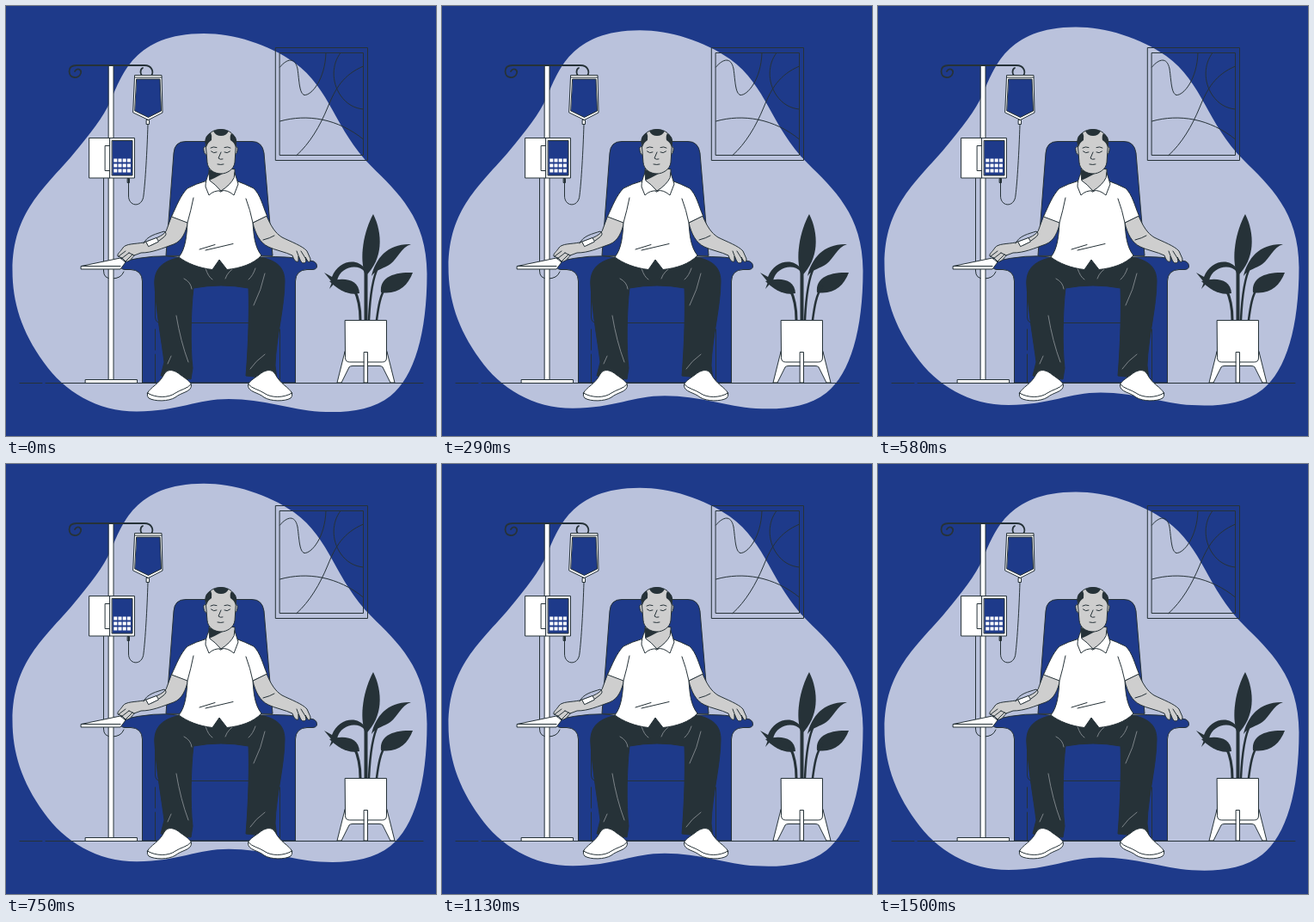
Animation of 500x500 px, one loop 1.54 s. Source, as an HTML page with a canvas:

```html
<!DOCTYPE html>
<html lang="en">
<head>
<meta charset="utf-8">
<title>Infusion therapy</title>
<style>
html, body { margin: 0; width: 100%; height: 100%; overflow: hidden; background: #1e3a8a; }
canvas { display: block; width: 100vw; height: 100vh; }
</style>
</head>
<body>
<canvas id="stage" width="500" height="500"></canvas>
<script>
const ctx = document.getElementById('stage').getContext('2d');
const BLUE = '#1e3a8a', PALE = '#bac2dc', INK = '#263238', WHITE = '#fff', SKIN = '#cecece', CREASE = '#7d8489';
const LOOP = 1540, TICK = 1000 / 24, PERIOD = 1500, LIFT = 10;

ctx.lineCap = ctx.lineJoin = 'round';

function shape(d, fill, stroke = INK, width = 1) {
  const path = new Path2D(d);
  if (fill) { ctx.fillStyle = fill; ctx.fill(path); }
  if (stroke) { ctx.strokeStyle = stroke; ctx.lineWidth = width; ctx.stroke(path); }
}
const line = (d, color = INK, width = 1) => shape(d, null, color, width);
const box = (x, y, w, h, fill, stroke = INK) => shape(`M${x},${y}h${w}v${h}h${-w}Z`, fill, stroke);

function mirrored(axis, draw) {
  draw();
  ctx.save();
  ctx.translate(2 * axis, 0);
  ctx.scale(-1, 1);
  draw();
  ctx.restore();
}

function backdrop(lift) {
  ctx.fillStyle = BLUE;
  ctx.fillRect(0, 0, 500, 500);
  ctx.save();
  ctx.translate(0, -lift);
  shape(`M230,32.5 C265,32.5 305,45 335,66 C378,97 382,144 425,187
    C455,217 489.5,247 489.5,312 C489.5,380 475,432 447,454 C425,471 395,474 365,472.2
    C330,470 300,457.5 259,457.5 C222,457.5 200,471.8 152,472 C106,472 68,449 44,415
    C18,379 7.5,345 7.5,308 C7.5,240 45,212 78,173 C98,149 113,130 122,110
    C135,81 149,32.5 230,32.5Z`, PALE, null);
  ctx.restore();
}

function picture() {
  box(313.7, 48.5, 106.8, 131);
  box(318.5, 54.5, 97, 119);
  line('M318.5,71 C327,61 336,59 339,73 C341,87 341,102 347,103.5 C355,104 371,86 372,54.5');
  line('M389,54.5 C379,67 378,88 389,104 C396,114 405,119 415.5,120');
  line('M415.5,70 C392,80 383,96 374,118 C365,140 353,160 338,173.5');
  line('M318.5,134 C350,125 386,131 415.5,155');
}

function stand() {
  line('M116,163 Q113.5,164 113.5,172 V308 Q113.5,317 123,317 Q134,317 137,309');
  box(119.5, 69.5, 5.5, 365, WHITE);
  box(92.5, 434.5, 60, 4, WHITE);
  line('M80,76 C83,71 88,74 87,78 C85,85 74,85 73.5,76 C73.5,71 77,69 82,69 H161 C170,69 172,77 169,81 C165,85 157,83 156.5,77 Q156.5,73 159,72', INK, 1.8);

  shape('M150,80.5 H181 L182,124 L165.5,132.5 L148,124Z', WHITE);
  line('M149.5,83 H181');
  shape('M152,85 H179 L180.5,122 L165.5,129.5 L150,122Z', BLUE);
  box(163.5, 132.5, 3, 5, WHITE);
  line('M165,138 C164,170 162,204 160,220 C159,235 142,234 142.5,220 V205');

  box(97, 153.5, 24, 46.5, WHITE);
  box(115.5, 162.5, 6, 29, WHITE);
  box(121, 153.5, 28.5, 46.5, WHITE);
  box(123.5, 156.5, 23.5, 40.5, BLUE);
  for (let row = 0; row < 3; row++)
    for (let col = 0; col < 4; col++)
      box(125.3 + col * 5.2, 177.5 + row * 6, 4, 4, WHITE, null);
  box(141.5, 200.5, 2, 5, INK);
}

function chair() {
  shape('M186,290 L195,171 Q196,157.5 209,157.5 H286 Q298,157.5 300,171 L310,290Z', BLUE);
  shape(`M135,297 Q175,288 200,292 H297 Q330,290 358,297 Q362,299 361.5,303 Q361,306.5 356,306.5 H350
    Q337,307 336.5,320 V438 H158.5 V320 Q158,307 145,306.5 H138 Q133,306 133,302Z`, BLUE);
  line('M173.5,318 V362 Q174,368.5 180,368.5 H314 Q319,368 319,362 V330');
  line('M173.5,376 V400 M173.5,405 V438 M318.5,376 V438');
}

function plant() {
  shape('M418,314 C410,293 416,262 427,242 C438,264 439,294 418,314Z', INK, null);
  shape('M425,314 C430,293 444,276 471,277 C459,281 456,293 447,300 C440,305 431,306 425,314Z', INK, null);
  shape('M436,333 C434,316 450,309 473,310 C467,326 455,336 436,333Z', INK, null);
  shape('M417,309 C409,299 389,303 385,319 L376,329 L379,321 L370,310 L379,315 C386,296 408,292 417,305Z', INK, null);
  shape('M376,320 C394,315 410,318 411,334 C398,337 386,330 376,320Z', INK, null);
  line('M418.5,365 V308', INK, 4);
  line('M412,365 C412,352 409,338 405,330', INK, 3);
  line('M422,365 C423,343 425,318 433,303', INK, 2.5);
  line('M431,365 C433,350 435,336 442,326', INK, 2.5);
  mirrored(418.5, () => shape('M394,402 L385,438 H390 L399,420 Q400,418.5 403,418.5 H418.5 V412 H396Z', WHITE));
  shape('M394.5,365.5 H442.5 V409 Q442.5,414 437.5,414 H399.5 Q394.5,414 394.5,409Z', WHITE);
  box(416.5, 402.5, 4, 35.5, WHITE);
}

function legs() {
  shape(`M203,292 C184,296 171,304 173,326 C175,357 181,390 184,414 L180,430 L215,434 L217,421
    C214,396 215,352 218,328 Q250,322 282,328 C283,352 282,393 279,430 L315,434 L313,418
    C314,385 324,350 324,320 C324,302 312,295 295,292Z`, INK);
  line('M207,317 Q215,321 216,329 M232,305 Q235,315 240,318 M268,303 Q258,308 255,317', CREASE);
  line('M290,305 Q287,314 282,318 M301,311 Q297,330 288,348 M198,360 Q203,390 212,414', CREASE);
  line('M301,405 Q290,413 284,422 M192,407 L188,416', CREASE);
  mirrored(248.5, () => {
    shape(`M164.5,450 C168,443 178,440 184,428 C188,421 196,423 203,429 C210,434 215,437 215.5,441
      C215.5,449 204,449 197,455 C189,460 173,460 166,456 Q163.5,454 164.5,450Z`, WHITE);
    line('M164.5,450 C174,456 189,456 197,450 C203,446 211,445 215,440');
  });
}

function arms() {
  shape('M87.5,302.5 L133,293 L139,298 L133,306 H87.5Z', WHITE);
  line('M87.5,302.5 H133');
  shape(`M193,244 L212,250 C209,263 205,273 195,277 C181,282 170,287 157,287 L149,290
    C146,294 143,298 139,297 L135,293 L130,291 C129,288 133,286 136,281 C140,276 150,277 160,275
    C172,271 182,268 186,262Z`, SKIN);
  line('M131,291 L139,285 M134,294 L143,287 M139,297 L147,289 M143,287 L149,290');
  line('M160,276 C164,267 175,265 184,262 Q189,265 182,270 Q176,275 169,278');
  shape('M163,274 L175,269.5 L177.5,274 L166,279.5Z', WHITE);

  shape(`M287,252 L303,244 C308,256 313,264 321,269 C331,274 345,279 350,285 L354,294
    Q354,299 351,297 L348,292 L349,297 Q346,301 343,297 L340,291 L340,297 Q336,299 333,290
    C325,286 313,284 305,280 C295,275 290,265 287,252Z`, SKIN);
  line('M299,272 Q307,270 312,267 M338,285 L341,293 M343,285 L348,293');
}

function torso() {
  shape('M236,190 L236,208 L250,218 L266,207 V190Z', SKIN);
  shape('M236,190 L252,195 Q243,200 236,203Z', INK, null);
  shape(`M234,203 Q220,207 211,212 C203,220 198,233 192.5,245 L211,252 C210,267 209,282 201,292
    C210,299 225,305 240,306.5 L248,295 L257,306.5 C272,305 288,300 297,290 C289,280 288,266 287,252
    L303.5,244 C298,231 296,220 288,212 Q278,207 267,203 L250,216Z`, WHITE);
  line('M218,223 Q215,238 211,252 M279,224 Q284,237 287,252');
  shape('M236,194 C233,201 232,205 232,210 L236,220 Q242,214 250,215 Q243,207 237,203Z', WHITE);
  shape('M266,194 L270,207 L265,220 Q257,213 250,215 Q261,208 265,200Z', WHITE);
  line('M225,283 L243,277.5 M232,284 L264,276.5');
}

function head() {
  mirrored(249.5, () => shape('M233,164 Q229,162 230,168 Q231,174 234,173Z', SKIN));
  shape(`M232,157 C234,148 241,143.5 250,143.5 C259,143.5 267,149 267.5,159 L266,182
    C265,190 257,195 250,195 C242,195 234.5,190 234,182Z`, SKIN);
  shape('M241,145.5 Q250,140.5 259,145.5 Q256,151 250,151 Q244,151 241,145.5Z', INK, null);
  shape('M238,147 Q231,151 231.5,158 L233.5,164 Q234,159 239,156 Q240,151 238,147Z', INK, null);
  shape('M262,148 Q269,152 268,159 L266.5,164 Q266,159 261,156 Q260,151 262,148Z', INK, null);
  line('M238,165 Q241,163 245,164.5 M254,164.5 Q258,163 261,165');
  line('M238.5,169 Q241.5,172 245,170 M254,170 Q257,172 260.5,169');
  line('M250,170 L247,177 Q249,179 252,178 M246,184 Q250,185 253,184');
}

function draw(ms) {
  const tick = Math.floor((ms % LOOP + 4) / TICK) % 37;
  const phase = (40 + tick * 40.55) / PERIOD;
  backdrop(LIFT * (1 - Math.abs(2 * phase - 1)));
  picture();
  line('M16,438.5 H42 M46,438.5 H485');
  chair();
  stand();
  plant();
  legs();
  arms();
  torso();
  head();
}

const start = performance.now();
function loop() {
  draw(performance.now() - start);
  requestAnimationFrame(loop);
}
loop();
</script>
</body>
</html>
```
